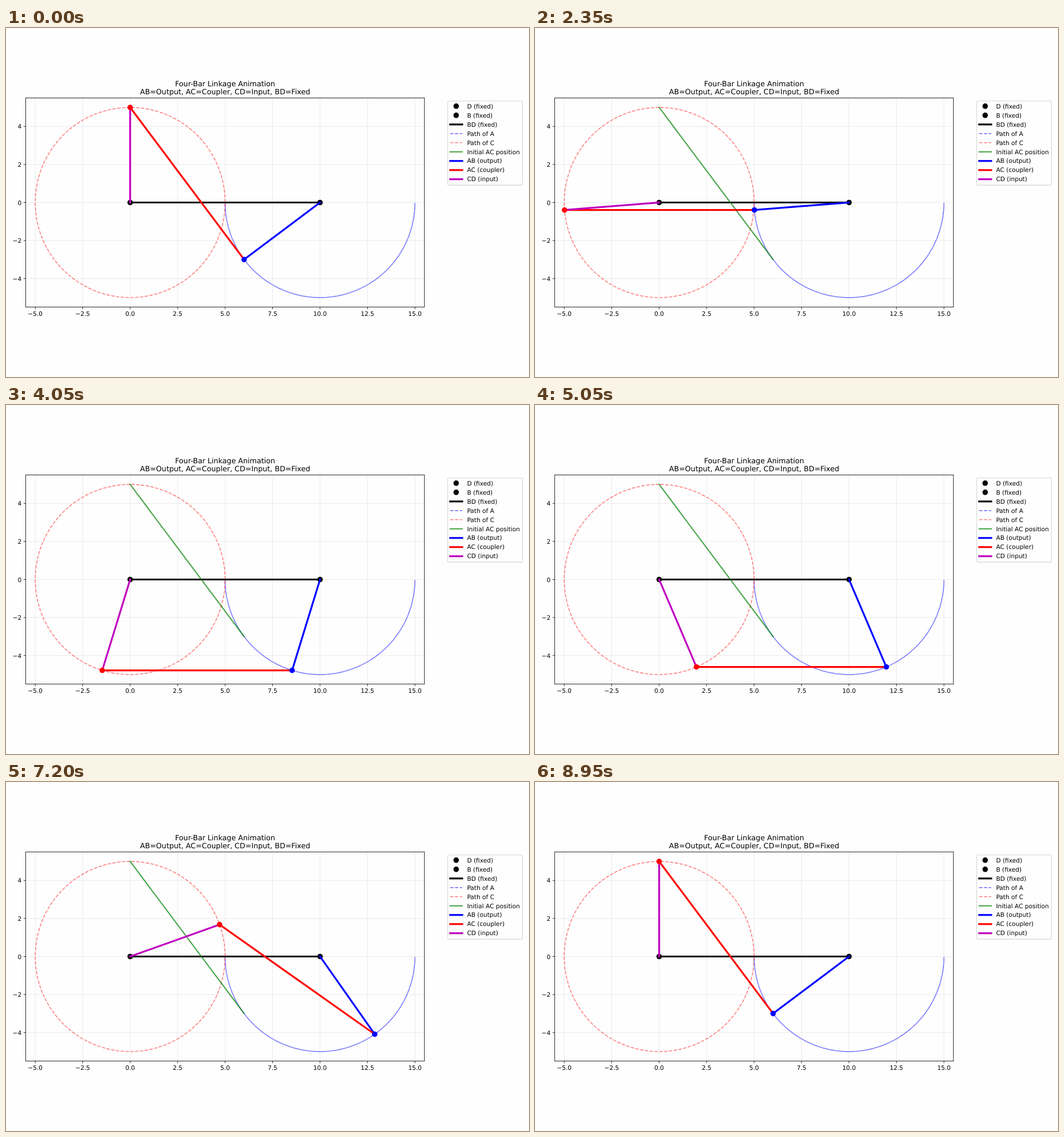
These frames come from a looping animation (917x611 px, 9 s). An HTML page:

```html
<!DOCTYPE html>
<html lang="en">
<head>
<meta charset="utf-8">
<title>Four-Bar Linkage Animation</title>
<style>
  html, body { margin: 0; width: 100%; height: 100%; overflow: hidden; background: #fefefe; }
  svg { display: block; width: 100%; height: 100%; }
  text { font: 10.614px "DejaVu Sans", sans-serif; text-rendering: geometricPrecision; }
  .title { font-size: 12.737px; }
</style>
</head>
<body>
<svg id="stage" viewBox="0 0 917 611"></svg>
<script>
const PT = 917 / 864;            // 12-inch wide figure, in pixels per point
const SCALE = 33.29;
const ORIGIN = { x: 217.7, y: 305.5 };
const STEPS = 180, STEP_MS = 50;
const CRANK = 5, ROCKER = 5, COUPLER = 10;
const D = [0, 0], B = [10, 0];
const DASH = [3.7 * 1.5 * PT, 1.6 * 1.5 * PT].join(' ');
const MAGENTA = '#bf00bf';

const stage = document.getElementById('stage');
const px = x => ORIGIN.x + x * SCALE;
const py = y => ORIGIN.y - y * SCALE;

function add(tag, attrs, text) {
  const node = document.createElementNS('http://www.w3.org/2000/svg', tag);
  for (const key in attrs) node.setAttribute(key, attrs[key]);
  if (text) node.textContent = text;
  return stage.appendChild(node);
}

const label = (text, x, y, anchor, cls = '') =>
  add('text', { x, y, 'text-anchor': anchor, class: cls }, text);

const line = (x1, y1, x2, y2, stroke, points, more = {}) =>
  add('line', { x1, y1, x2, y2, stroke, 'stroke-width': points * PT, ...more });

const dot = (x, y, fill) => add('circle', { cx: x, cy: y, r: 4.5 * PT, fill });

const SOLID = { 'stroke-linecap': 'square' };
const GHOST = { ...SOLID, opacity: 0.7 };
const TRACE = { 'stroke-dasharray': DASH, opacity: 0.5 };

const bar = (p, q, color, points = 3, more = SOLID) =>
  line(px(p[0]), py(p[1]), px(q[0]), py(q[1]), color, points, more);

function moveBar(node, p, q) {
  node.setAttribute('x1', px(p[0]));
  node.setAttribute('y1', py(p[1]));
  node.setAttribute('x2', px(q[0]));
  node.setAttribute('y2', py(q[1]));
}

function moveDot(node, p) {
  node.setAttribute('cx', px(p[0]));
  node.setAttribute('cy', py(p[1]));
}

// Crank pin C turns evenly; A is the lower crossing of the two link circles.
function pose(step) {
  const turn = 2 * Math.PI * step / (STEPS - 1);
  const C = [-CRANK * Math.sin(turn), CRANK * Math.cos(turn)];
  const dx = C[0] - B[0], dy = C[1] - B[1], dist = Math.hypot(dx, dy);
  const along = (ROCKER ** 2 - COUPLER ** 2 + dist ** 2) / (2 * dist);
  const off = Math.sqrt(Math.max(0, ROCKER ** 2 - along ** 2));
  const ux = dx / dist, uy = dy / dist;
  const A = [B[0] + along * ux - off * uy, B[1] + along * uy + off * ux];
  return { A, C };
}

const poses = Array.from({ length: STEPS }, (_, i) => pose(i));

const trace = (joint, stroke) => add('polyline', {
  points: poses.map(p => px(p[joint][0]) + ',' + py(p[joint][1])).join(' '),
  fill: 'none', stroke, 'stroke-width': 1.5 * PT, 'stroke-linejoin': 'round', ...TRACE
});

// Axes
const left = px(-5.5), right = px(15.5), top_ = py(5.5), bottom = py(-5.5);
const tickText = (v, digits) => v.toFixed(digits).replace('-', '\u2212');

for (let x = -5; x <= 15; x += 2.5) {
  line(px(x), top_, px(x), bottom, '#b0b0b0', 0.8, { opacity: 0.3 });
  line(px(x), bottom, px(x), bottom + 3.5 * PT, '#000', 0.8);
  label(tickText(x, 1), px(x), 504.2, 'middle');
}
for (let y = -4; y <= 4; y += 2) {
  line(left, py(y), right, py(y), '#b0b0b0', 0.8, { opacity: 0.3 });
  line(left - 3.5 * PT, py(y), left, py(y), '#000', 0.8);
  label(tickText(y, 0), left - 7 * PT, py(y) + 4, 'end');
}

// Linkage
dot(px(D[0]), py(D[1]), '#000');
dot(px(B[0]), py(B[1]), '#000');
bar(D, B, '#000');
trace('A', '#00f');
trace('C', '#f00');
bar(poses[0].A, poses[0].C, '#008000', 2, GHOST);
const output = bar(B, B, '#00f');
const coupler = bar(B, B, '#f00');
const input = bar(D, D, MAGENTA);
const pinA = dot(0, 0, '#00f');
const pinC = dot(0, 0, '#f00');

// Frame and title
add('rect', {
  x: left, y: top_, width: right - left, height: bottom - top_,
  fill: 'none', stroke: '#000', 'stroke-width': 0.8 * PT
});
const middle = (left + right) / 2;
label('Four-Bar Linkage Animation', middle, 101.6, 'middle', 'title');
label('AB=Output, AC=Coupler, CD=Input, BD=Fixed', middle, 116.05, 'middle', 'title');

// Legend
add('rect', {
  x: 774.5, y: 127.8, width: 131, height: 147.3, rx: 2.1,
  fill: '#fefefe', stroke: '#ccc', 'stroke-opacity': 0.8, 'stroke-width': PT
});
[
  ['D (fixed)', '#000'],
  ['B (fixed)', '#000'],
  ['BD (fixed)', '#000', 3, SOLID],
  ['Path of A', '#00f', 1.5, TRACE],
  ['Path of C', '#f00', 1.5, TRACE],
  ['Initial AC position', '#008000', 2, GHOST],
  ['AB (output)', '#00f', 3, SOLID],
  ['AC (coupler)', '#f00', 3, SOLID],
  ['CD (input)', MAGENTA, 3, SOLID]
].forEach(([name, color, points, style], row) => {
  const y = 136.9 + 15.98 * row;
  if (points) line(778.7, y, 799.95, y, color, points, style);
  else dot(789.3, y, color);
  label(name, 808.4, y + 3.7, 'start');
});

function draw() {
  const { A, C } = poses[Math.floor(performance.now() / STEP_MS) % STEPS];
  moveBar(output, A, B);
  moveBar(coupler, A, C);
  moveBar(input, C, D);
  moveDot(pinA, A);
  moveDot(pinC, C);
  requestAnimationFrame(draw);
}
draw();
</script>
</body>
</html>
```
